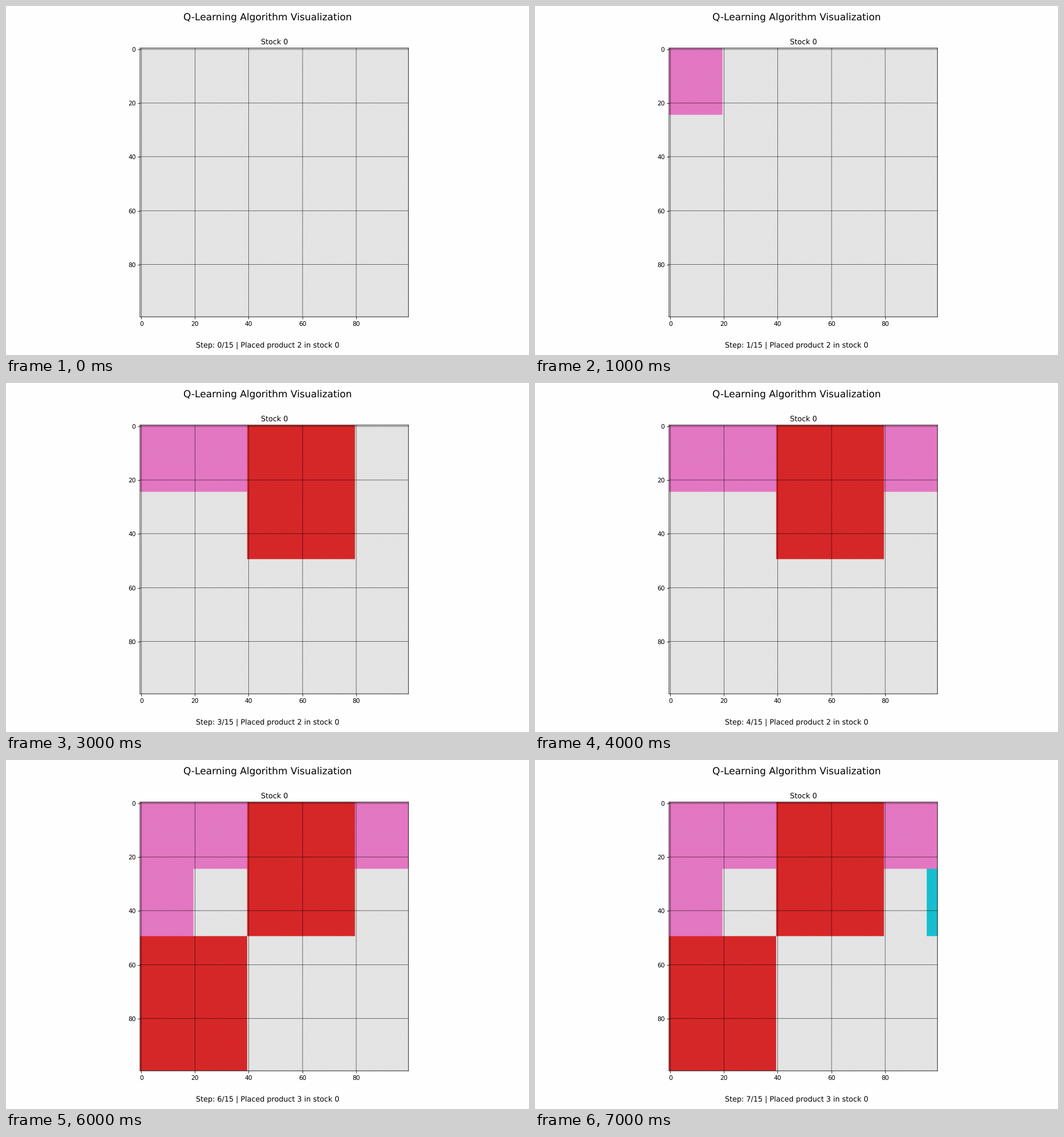
These frames come from a looping animation (917 by 611 pixels, 8 s). A matplotlib script:

```python
import itertools

import numpy as np
import matplotlib.pyplot as plt
from matplotlib.animation import FuncAnimation
from matplotlib.colors import to_rgb

W, H, DPI = 917, 611, 76.4
PAGE_W, PAGE_H = 1200, 800      # layout units, scaled down to the stage
SIZE, SIDE = 100, 616           # stock cells, and the side of the plot in layout units
STEPS = 15

EMPTY = "#e4e4e4"
# product: colour, width, height, scan from the right
PRODUCTS = {
    1: ("#d62728", 40, 50, False),
    2: ("#e377c2", 20, 25, False),
    3: ("#17becf", 4, 25, True),
}
ORDER = [2, 2, 1, 2, 2, 1, 3, 3]

plt.rcParams.update({
    "font.family": "DejaVu Sans",
    "text.hinting": "none",
    "path.snap": False,
})


def place(stock, product):
    """Put the product in the first free spot, row by row."""
    _, w, h, from_right = PRODUCTS[product]
    columns = range(SIZE - w + 1)
    if from_right:
        columns = columns[::-1]
    for y, x in itertools.product(range(SIZE - h + 1), columns):
        spot = stock[y:y + h, x:x + w]
        if not spot.any():
            spot[:] = product
            return


def stock_image(step):
    """Plot-sized picture of the stock after the given number of placements."""
    stock = np.zeros((SIZE, SIZE), dtype=int)
    for product in ORDER[:step]:
        place(stock, product)
    palette = np.array([to_rgb(EMPTY)] + [to_rgb(PRODUCTS[p][0]) for p in (1, 2, 3)])
    cell = ((np.arange(SIDE) + 0.5) * SIZE / SIDE).astype(int)
    return palette[stock[np.ix_(cell, cell)]]


fig = plt.figure(figsize=((W + 0.01) / DPI, (H + 0.01) / DPI), dpi=DPI,
                 facecolor="#fefefe")
fig.suptitle("Q-Learning Algorithm Visualization", fontsize=16)
caption = fig.text(0.5, 0.02, "", ha="center", fontsize=12)

ax = fig.add_axes([307.5 / PAGE_W, 87.5 / PAGE_H, SIDE / PAGE_W, SIDE / PAGE_H],
                  facecolor=EMPTY)
ax.set_title("Stock 0", fontsize=12)
sheet = ax.imshow(stock_image(0), interpolation="bilinear", aspect="auto")
ax.set_xlim(0, SIDE)
ax.set_ylim(SIDE, 0)

labels = np.arange(0, SIZE, 20)
ticks = np.round((labels + 0.5) * SIDE / SIZE)
ax.set_xticks(ticks, labels)
ax.set_yticks(ticks, labels)
ax.grid(color="black", linewidth=0.5)


def update(step):
    sheet.set_data(stock_image(step))
    caption.set_text(f"Step: {step}/{STEPS} | Placed product {ORDER[step]} in stock 0")
    return sheet, caption


anim = FuncAnimation(fig, update, frames=len(ORDER), interval=1000,
                     repeat=True, repeat_delay=0)
plt.show()
```
